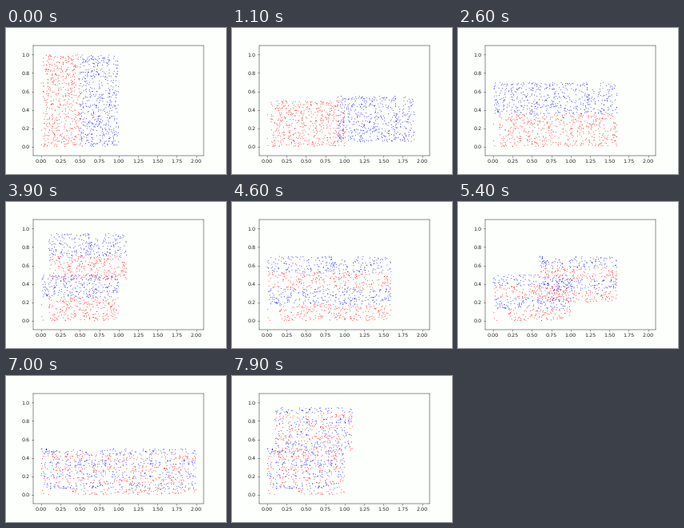
A matplotlib script that plays this animation: 275x183 px, repeating every 8000 ms.

```python
import numpy as np
import matplotlib.pyplot as plt
from matplotlib.animation import FuncAnimation

W, H = 275, 183
DPI = W / 6
N = 1000
STEPS = 10      # frames per stretch and per fold
ROUNDS = 4
PAPER = "#fdfffc"

plt.rcParams.update({
    "font.family": "DejaVu Sans",
    "font.size": 10,
    "text.hinting": "none",
    "axes.facecolor": PAPER,
    "axes.linewidth": 0.7,
    "xtick.color": "0.15",
    "ytick.color": "0.15",
})

rng = np.random.default_rng(3)
x0 = rng.uniform(0.024, 1, N)
x0[:3] = 0.001, 0.002, 0.006
y0 = rng.uniform(0, 1, N)
y0[:3] = 0.69, 0.18, 0.02
colors = np.where(x0 < 0.5, "red", "blue")


def stretch(x, y, t):
    return x * (1 + t), y * (1 - t / 2)


def fold(x, y, t):
    """Slide the right half of the stretched sheet on top of the left."""
    right = x >= 1
    return x - t * right, y + t / 2 * right


def baker(frame):
    rounds, step = divmod(frame, 2 * STEPS)
    x, y = x0, y0
    for _ in range(rounds):
        x, y = fold(*stretch(x, y, 1), 1)
    t = step / STEPS
    x, y = stretch(x, y, min(t, 1))
    if t > 1:
        x, y = fold(x, y, t - 1)
    return np.column_stack([x, y])


fig = plt.figure(figsize=(W / DPI, (H + 0.01) / DPI), dpi=DPI, facecolor=PAPER)
ax = fig.add_axes([0.125, 0.125, 0.774, 0.755])
ax.set_xlim(-0.1, 2.1)
ax.set_ylim(-0.1, 1.1)
ax.set_xticks(np.arange(0, 2.01, 0.25))
ax.set_yticks(np.arange(0, 1.01, 0.2))
dots = ax.scatter(x0, y0, s=2.4, c=colors, alpha=0.85, linewidths=0, snap=False)


def update(frame):
    dots.set_offsets(baker(frame))
    return (dots,)


anim = FuncAnimation(fig, update, frames=2 * STEPS * ROUNDS, interval=100,
                     repeat=True, repeat_delay=0)
plt.show()
```
